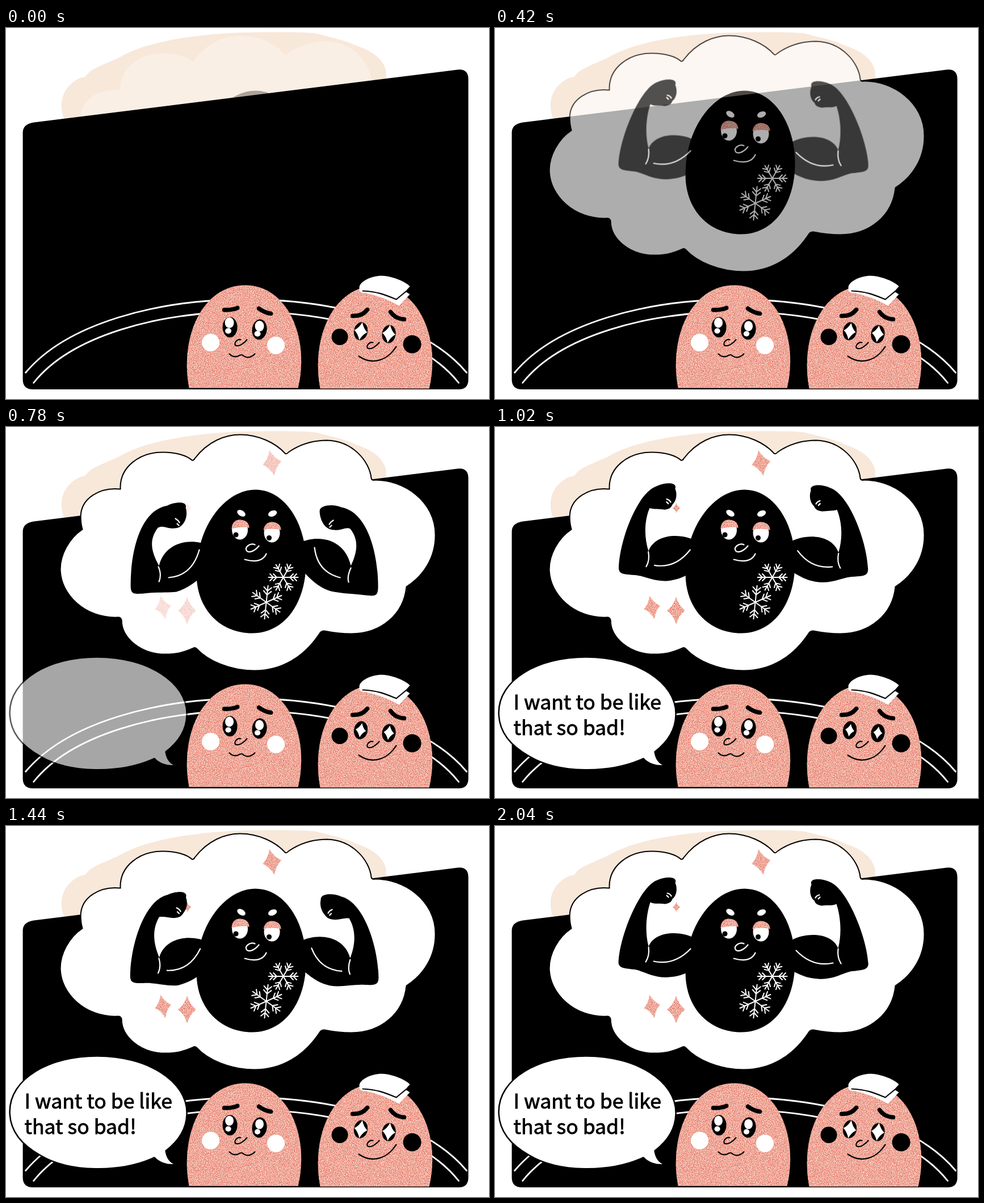
Recreate the animation shown at these times as an HTML page. Size 851x654 px, loop 2340 ms.

```html
<!DOCTYPE html>
<html lang="en">
<head>
<meta charset="utf-8">
<title>Potato dream</title>
<style>
  html, body { margin: 0; width: 100%; height: 100%; overflow: hidden; background: #fff; }
  svg { display: block; width: 851px; height: 654px; }
  text {
    font: 500 35.6px "Noto Sans CJK KR", "Noto Sans CJK JP", "Noto Sans CJK SC", "Noto Sans", sans-serif;
    stroke: #000; stroke-width: .9px;
  }
  .line { fill: none; stroke-linecap: round; stroke-linejoin: round; stroke-width: 2.2; }
  .white { stroke: #fff; }
  .black { stroke: #000; }
  .brow { stroke-width: 7.5; }
</style>
</head>
<body>
<svg viewBox="-.6 -.5 851 654">
  <defs>
    <filter id="grain" x="0" y="0" width="1" height="1" color-interpolation-filters="sRGB">
      <feTurbulence type="fractalNoise" baseFrequency=".9" numOctaves="2" seed="4"/>
      <feColorMatrix values="0 0 0 0 .894  0 0 0 0 .443  0 0 0 0 .373  4 0 0 0 -1.55"/>
      <feComposite in2="SourceGraphic" operator="in" result="dots"/>
      <feMerge><feMergeNode in="SourceGraphic"/><feMergeNode in="dots"/></feMerge>
    </filter>
    <clipPath id="above"><path d="M0 0H851V66L30 168H0Z"/></clipPath>
    <path id="potato" d="M322 634C305 545 345 453 421 453C495 453 535 545 514 634Z"/>
    <path id="nose" class="line" d="M413 549C406 547 400 556 404 559C410 562 419 555 424 549"/>
  </defs>

  <path fill="#f8e8da" d="M104 165C92 140 94 108 125 90C131 86 139 87 141 83C150 69 185 60 205 48C245 27 310 13 400 8Q500 5 545 9C575 17 600 22 615 30Q662 45 669 75Q670 85 667 95Z"/>
  <path d="M29 184Q29 169 48 166L795 73Q814 71 814 90V619Q814 636.500 797 636.500H47Q29 636.500 29 619Z"/>
  <g class="line white" style="stroke-width:2.8">
    <path d="M34 607C178 435 667 435 811 607"/>
    <path d="M48 625C180 458 665 458 797 625"/>
  </g>

  <g id="dream">
    <path id="cloud" fill="#fff" stroke="#000" stroke-width="2" stroke-linejoin="round"
      d="M131 158C131 125 165 105 201 109C199 70 235 44 275 44C300 44 318 50 327 58Q330 59 332 55C355 25 385 13 412 13C445 13 475 28 491 46Q494 48 497 44C520 28 545 23 565 23C610 24 640 60 643 90Q644 94 649 93C700 92 756 130 756 190C756 230 735 262 705 281C700 330 660 364 608 364C590 364 570 361 560 359Q556 359 553 362C525 405 485 429 437 429C395 429 355 412 335 390Q332 387 328 390C312 397 300 400 280 400C235 400 203 370 203 340Q202 335 197 335C140 338 95 295 95 250C95 225 110 196 134 180Q131 170 131 158Z"/>
    <path d="M439 110C491 110 528 170 528 238C528 310 490 363 433 363C378 363 335 322 335 258C335 172 387 110 439 110Z"/>
    <g fill="#fff">
      <ellipse cx="414" cy="151.500" rx="8" ry="5" transform="rotate(32 414 151.500)"/>
      <ellipse cx="469" cy="152" rx="8" ry="5" transform="rotate(-22 469 152)"/>
      <ellipse cx="411.500" cy="181" rx="14" ry="17"/>
      <ellipse cx="468" cy="186" rx="14" ry="17"/>
    </g>
    <g fill="#f8d8cd" filter="url(#grain)">
      <path d="M397 179Q398 163 412 163Q427 164 428 177Q412 174 397 179Z"/>
      <path d="M453 181Q456 167 468 167Q483 168 484 181Q468 177 453 181Z"/>
    </g>
    <circle cx="404.500" cy="189.500" r="4.500"/>
    <circle cx="463" cy="195" r="4.500"/>
    <g class="line white">
      <path d="M438 207C430 203 420 211 423 217C427 223 438 218 445 209"/>
      <path d="M420 233C438 238 452 236 458 223"/>
      <path id="flakes" stroke-width="2"/>
    </g>
  </g>

  <g id="sparkles" fill="#f8d8cd"></g>

  <g id="arms">
    <g>
      <path id="leftLimb"/>
      <path id="leftCreases" class="line white"/>
    </g>
    <g transform="matrix(-1 0 0 1 874 3)">
      <path id="rightLimb"/>
      <path id="rightCreases" class="line white"/>
    </g>
  </g>

  <g fill="#f8d8cd" filter="url(#grain)">
    <use href="#potato"/>
    <use href="#potato" x="231" y="1"/>
  </g>

  <g class="line black">
    <path class="brow" d="M384 496.500Q397 497 407 493"/>
    <path class="brow" d="M445 494Q454 501 466 503"/>
    <path d="M393 574Q400 581 408 578Q413 575 416 576Q426 585 438 574"/>
    <path class="brow" d="M610 507Q627 508 636 496"/>
    <path class="brow" d="M677 500Q685 512 701 513"/>
    <path d="M621 578C645 595 672 585 687 561"/>
    <use href="#nose"/>
    <use href="#nose" x="233" y="5"/>
  </g>
  <circle cx="360" cy="554" r="15.500" fill="#fff"/>
  <circle cx="475" cy="559" r="15.500" fill="#fff"/>
  <circle cx="587.500" cy="544" r="14.500"/>
  <circle cx="715" cy="557" r="16"/>
  <ellipse cx="394" cy="527" rx="13" ry="18"/>
  <ellipse cx="446" cy="531" rx="13" ry="18" transform="rotate(8 446 531)"/>
  <ellipse cx="624.500" cy="534" rx="12" ry="16" transform="rotate(10 624.500 534)"/>
  <ellipse cx="674" cy="539" rx="12" ry="16" transform="rotate(8 674 539)"/>
  <g id="shine" fill="#fff"></g>

  <path fill="#fff" d="M622 457C622 445 650 433 670 437C692 441 707 450 711 455L703 464L711 469L692 489C670 477 650 469 626 466Q621 463 622 457Z"/>
  <path class="line black" d="M628 463C655 464 670 471 687 478L704 464"/>

  <path id="bubble" fill="#fff" stroke="#000" stroke-width="2.500" stroke-linejoin="round"
    d="M281 572C283 585 290 593 299 596C283 599 268 592 261 584C200 612 110 610 60 580C20 558 6 530 6 503C6 445 75 405 160 405C250 405 318 450 318 505C318 530 306 553 281 572Z"/>
  <g id="words">
    <text x="32" y="497.500">I want to be like</text>
    <text x="32" y="542.500">that so bad!</text>
  </g>
</svg>

<script>
const STEP = 60, LOOP = 2340, LAST = 34 * STEP;
const $ = id => document.getElementById(id);
const clamp = v => Math.max(0, Math.min(1, v));

function add(parent, tag, attrs) {
  const node = document.createElementNS("http://www.w3.org/2000/svg", tag);
  for (const name in attrs) node.setAttribute(name, attrs[name]);
  return parent.appendChild(node);
}

const starPath = (w, h, pinch) => {
  const x = w * pinch, y = h * pinch;
  return `M0 ${-h}Q${x} ${-y} ${w} 0Q${x} ${y} 0 ${h}Q${-x} ${y} ${-w} 0Q${-x} ${-y} 0 ${-h}Z`;
};

function flakePath(cx, cy, size, turn) {
  let d = "";
  for (let i = 0; i < 6; i++) {
    const a = (turn + i * 60) * Math.PI / 180;
    const at = (r, s) => [
      cx + size * (r * Math.cos(a) - s * Math.sin(a)),
      cy + size * (r * Math.sin(a) + s * Math.cos(a))
    ].map(v => v.toFixed(1)).join(" ");
    d += `M${cx} ${cy}L${at(1, 0)}`;
    for (const r of [.45, .68]) d += `M${at(r + .22, -.23)}L${at(r, 0)}L${at(r + .22, .23)}`;
  }
  return d;
}

// Linear interpolation through [time, value] pairs
function track(keys, t) {
  if (t <= keys[0][0]) return keys[0][1];
  for (let i = 1; i < keys.length; i++) {
    const [t0, v0] = keys[i - 1], [t1, v1] = keys[i];
    if (t <= t1) return v0 + (v1 - v0) * (t - t0) / (t1 - t0);
  }
  return keys[keys.length - 1][1];
}

// Blends two paths that share the same commands
function blend(from, to, p) {
  const ends = to.match(/[\d.]+/g);
  let i = 0;
  return from.replace(/[\d.]+/g, n => (+n + (ends[i++] - n) * p).toFixed(2));
}

const limbUp = "M356 200C332 184 282 182 270 212C263 185 266 155 273 134C282 138 290 135 299 137C310 135 310 132 312 128C320 122 321 108 317 100C322 88 300 88 285 95C255 106 220 190 217 238C216 250 226 250 240 252C258 252 275 268 305 266C320 265 332 262 350 252Z";
const creasesUp = "M270 213Q272 228 265 239M279 238Q315 246 344 216M303 118Q308 119 310 123M302 122L305 125";
const limbsDown = {
  left: "M356 208C328 195 280 200 269 244C256 220 250 200 267 177C278 172 284 180 296 178C306 178 310 172 313 168C319 158 318 148 316 142C320 128 292 133 284 138C236 146 219 218 219 278C219 295 224 294 242 293C265 290 285 292 300 290C318 284 330 276 350 258Z",
  right: "M356 200C326 186 278 192 267 241C254 214 254 194 268 176C276 172 284 180 296 178C306 178 312 172 315 168C321 158 322 150 322 144C320 132 294 133 284 138C238 146 219 218 219 278C219 295 224 295 242 293C265 290 285 290 302 286C318 281 332 272 350 252Z"
};
const creasesDown = {
  left: "M268 246Q274 260 269 272M286 265Q327 262 340 216M298 161Q303 164 305 168M301 170L304 173",
  right: "M267 245Q274 260 271 270M286 262Q326 252 331 209M298 161Q303 164 305 168M301 170L304 173"
};

$("flakes").setAttribute("d", flakePath(488, 264.5, 26, 0) + flakePath(458, 308.5, 29.5, -24));

const sparkles = [
  [468, 63, 17, 23, -11, [[420, 0], [540, .4], [780, .6], [960, 1]]],
  [276, 317.5, 14.5, 21, -12, [[420, 0], [540, .35], [780, .35], [1020, 1]]],
  [318.5, 323, 16, 24, 0, [[480, 0], [540, .1], [780, .4], [1020, 1]]],
  [319, 142.5, 7, 8.5, 0, [[480, 0], [540, .07], [780, .2], [1020, 1]]]
].map(([x, y, w, h, turn, keys]) => ({
  keys,
  node: add($("sparkles"), "path", {
    d: starPath(w, h, .32), filter: "url(#grain)", transform: `translate(${x} ${y}) rotate(${turn})`
  })
}));

const eyeStars = [[624.5, 534, 10], [674, 538.5, 8]].map(([x, y, turn]) => ({
  place: `translate(${x} ${y}) rotate(${turn})`,
  node: add($("shine"), "path", { d: starPath(11.5, 16, .34) })
}));

const glints = [[393, 519, 8, 9.5], [391, 533.5, 5.5, 5], [446, 525, 8, 9.5], [442.5, 538.5, 5.5, 5]]
  .map(([x, y, rx, ry]) => ({
    place: `translate(${x} ${y})`,
    node: add($("shine"), "ellipse", { rx, ry })
  }));

const starKeys = [[60, 1], [540, .9], [1020, .7], [1440, 1], [1740, .85], [2040, 1]];

// Two flexes: four steps down, five steps up
function flexAt(t) {
  const k = (t - 540) / STEP;
  if (k < 0 || k >= 18) return 0;
  const phase = k % 9;
  return phase < 4 ? phase / 4 : (9 - phase) / 5;
}

function draw(t) {
  const waiting = t < 300;
  const fade = waiting ? .3 : clamp(.28 + (t - 300) / STEP * .2);
  $("dream").setAttribute("opacity", fade);
  $("dream").setAttribute("clip-path", waiting ? "url(#above)" : "none");
  $("cloud").setAttribute("stroke-opacity", waiting ? 0 : 1);
  $("arms").setAttribute("opacity", waiting ? 0 : fade);

  const flex = flexAt(t);
  for (const side of ["left", "right"]) {
    $(side + "Limb").setAttribute("d", blend(limbUp, limbsDown[side], flex));
    $(side + "Creases").setAttribute("d", blend(creasesUp, creasesDown[side], flex));
  }

  for (const { node, keys } of sparkles) node.setAttribute("opacity", track(keys, t));

  const starSize = track(starKeys, t);
  for (const { node, place } of eyeStars) node.setAttribute("transform", `${place} scale(${starSize})`);
  const glintSize = 1 - .08 * Math.sin(Math.PI * t / 600) ** 2;
  for (const { node, place } of glints) node.setAttribute("transform", `${place} scale(${glintSize})`);

  $("bubble").setAttribute("opacity", clamp((t - 585) / 300));
  $("words").setAttribute("opacity", clamp((t - 780) / 240));
}

const start = performance.now();
let shown = -1;

function tick() {
  const now = (performance.now() - start) % LOOP;
  const t = now < 300 ? 0 : Math.min(LAST, Math.floor(now / STEP) * STEP);
  if (t !== shown) draw(shown = t);
  requestAnimationFrame(tick);
}
tick();
</script>
</body>
</html>
```
